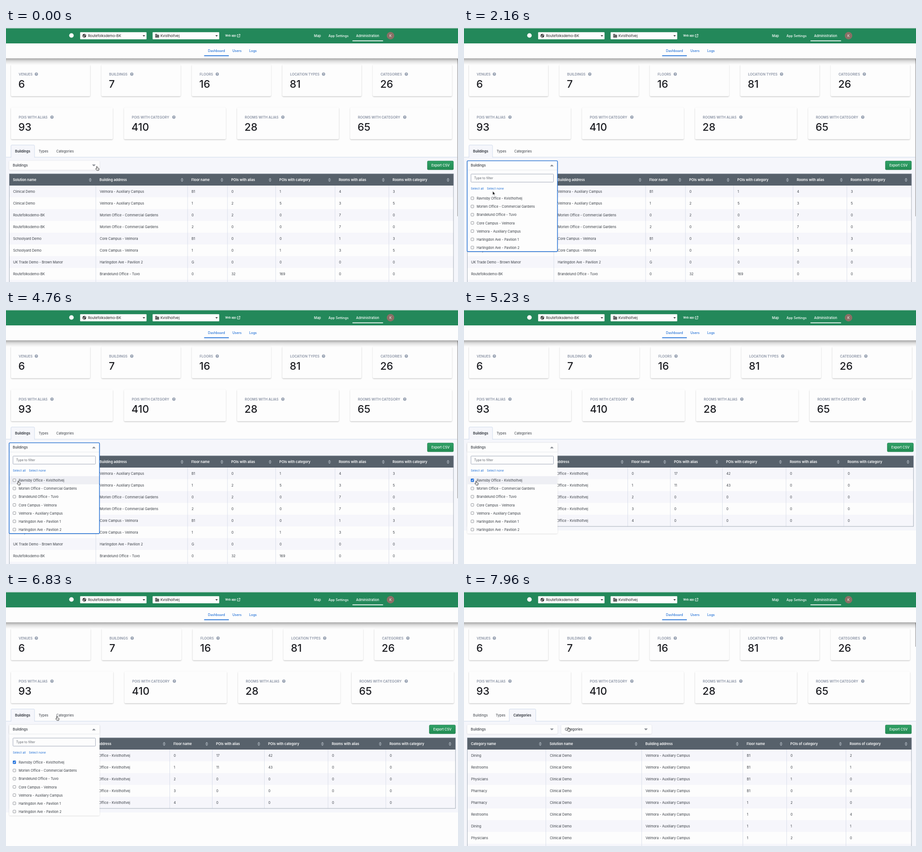
Recreate the animation shown at these times as an HTML page. Size 998 by 561 pixels, loop 8000 ms.

```html
<!DOCTYPE html>
<html lang="en">
<head>
<meta charset="utf-8">
<title>Dashboard filter</title>
<style>
  html, body { margin: 0; width: 100%; height: 100%; overflow: hidden; background: #fdfdfd; }
  svg { display: block; width: 100%; height: 100%; font-family: Inter, Roboto, "Liberation Sans", sans-serif; }
  text { white-space: pre; }
</style>
</head>
<body>
<svg id="stage" viewBox="0 0 998 561"></svg>
<script>
const LOOP = 8000;
const INK = '#383d44', BLUE = '#1f6fd6', GREEN = '#23885a', PANEL = '#f5f6fb';

// ---- drawing helpers ----
const rect = (x, y, w, h, fill, extra = '') =>
  `<rect x="${x}" y="${y}" width="${w}" height="${h}" fill="${fill}" ${extra}/>`;
const path = (d, fill, extra = '') => `<path d="${d}" fill="${fill}" ${extra}/>`;
const line = (x1, y1, x2, y2, color, width = 1) =>
  path(`M${x1} ${y1}L${x2} ${y2}`, 'none', `stroke="${color}" stroke-width="${width}"`);
// y is the middle of the capitals
const text = (x, y, str, size = 7.45, weight = 400, fill = INK, extra = '') =>
  `<text x="${x}" y="${y + size * 0.36}" font-size="${size}" font-weight="${weight}" fill="${fill}" ${extra}>${str}</text>`;
const down = (x, y, w, h, fill) => path(`M${x - w} ${y - h}H${x + w}L${x} ${y + h}Z`, fill);
const up = (x, y, w, h, fill) => path(`M${x - w} ${y + h}H${x + w}L${x} ${y - h}Z`, fill);
const group = (id, body, extra = '') => `<g id="${id}" ${extra}>${body}</g>`;

// ---- names ----
const ROUTE = 'Routefolksdemo-BK', CLINIC = 'Clinical Demo', SCHOOL = 'Schoolyard Demo';
const STREET = 'Kvistholtvej';
const SATELLITE = 'Velmora - Auxiliary Campus', MAIN = 'Core Campus - Velmora';
const TERRACE = 'Morlen Office - Commercial Gardens', HARBOUR = 'Brandelund Office - Tuvo';
const AVENUE = 'Harlingdon Ave - Pavilion ', RIVER = `Ravnsby Office - ${STREET}`;
const PLACES = [RIVER, TERRACE, HARBOUR, MAIN, SATELLITE, AVENUE + 1, AVENUE + 2];

// ---- top of the page ----
function topBar() {
  const picker = (x, w, name) =>
    rect(x, 9.3, w, 15.6, '#fdfdfd', 'rx="1.2"') + text(x + 17.3, 17, name, 7.75, 400, '#1c1c1c') +
    down(x + w - 5.8, 17.5, 2.7, 1.4, '#333');
  const globe = `<circle cx="173" cy="17" r="4" fill="#333"/>` +
    path('M170.3 15.2L172 17.6 173.2 18 172.8 20.2 171 18.6ZM173.5 13.8L175.6 15 174.8 17.4 173.6 15.8Z', '#fdfdfd');
  const block = path('M329.5 13H333.6V15H338V21H329.5Z', '#444') +
    [14.3, 16.2, 18.1].map(y => rect(330.6, y, 2, 0.8, '#fdfdfd')).join('') +
    [16.4, 18.4].map(y => rect(334.6, y, 2, 0.8, '#fdfdfd')).join('');
  return rect(0, 0, 998, 34, GREEN) + rect(0, 0, 998, 0.8, '#dbe7e0') +
    `<circle cx="144.5" cy="16.5" r="5" fill="#fdfdfd"/>` +
    picker(163.7, 146.6, ROUTE) + globe + picker(323.7, 147.1, STREET) + block +
    text(484, 17, 'Web app', 5.6, 600, '#fff') +
    path('M513 14.5H510.7V20H516.2V17.6M514 13.9H516.8V16.7M516.6 14.1L513 17.7', 'none', 'stroke="#fff" stroke-width=".9"') +
    text(680, 17, 'Map', 7.35, 500, '#fff') + text(712, 17, 'App Settings', 7.25, 500, '#fff') +
    text(773, 17, 'Administration', 7.35, 500, '#fff') + rect(765, 27.5, 67.5, 1.7, '#fff') +
    `<circle cx="849" cy="17" r="8.3" fill="#8b6f66"/>` +
    text(849, 17, 'K', 8, 400, '#f5efec', 'text-anchor="middle"') +
    rect(0, 34, 998, 33, '#fdfdfd') +
    text(446, 50.3, 'Dashboard', 7.2, 500, BLUE) + text(500, 50.3, 'Users', 7.2, 500, BLUE) +
    text(537, 50.3, 'Logs', 7.2, 500, BLUE) + rect(437.5, 60.4, 54.5, 1.8, BLUE);
}

// ---- statistic cards ----
// each entry: label, value, distance from label start to help icon
const STATS = [
  [['VENUES', 6, 39], ['BUILDINGS', 7, 50], ['FLOORS', 16, 39], ['LOCATION TYPES', 81, 74], ['CATEGORIES', 26, 57]],
  [['POIS WITH ALIAS', 93, 73.5], ['POIS WITH CATEGORY', 410, 93], ['ROOMS WITH ALIAS', 28, 84], ['ROOMS WITH CATEGORY', 65, 103.5]]
];
function cards(right) {
  const gap = 25;
  return STATS.map((row, r) => {
    const w = (right - 11 + gap) / row.length - gap, y = 80.5 + r * 95;
    return row.map(([label, value, help], i) => {
      const x = 11 + i * (w + gap), tx = x + 17;
      return rect(x, y, w, 70, '#fdfdfd', 'rx="2.5" filter="url(#lift)"') +
        text(tx, y + 21.7, label, 7.5, 600, '#8891a3') +
        `<circle cx="${tx + help}" cy="${y + 21.3}" r="3.6" fill="#98a2b2"/>` +
        text(tx + help, y + 21.4, '?', 5.4, 700, '#fdfdfd', 'text-anchor="middle"') +
        text(tx - 0.7, y + 43, value, 23, 500, '#1c1d22');
    }).join('');
  }).join('');
}

// ---- tabs, toolbar and table ----
function tabs(active) {
  const [x0, x1] = active ? [100, 158.5] : [11, 63];
  const xs = active ? [20, 70, 109] : [20, 72, 111];
  return line(0, 285.3, 998, 285.3, '#cdd9ea') +
    path(`M${x0} 286V260.5Q${x0} 258.5 ${x0 + 2} 258.5H${x1 - 2}Q${x1} 258.5 ${x1} 260.5V286`, PANEL, 'stroke="#c6d4e8" stroke-width=".8"') +
    ['Buildings', 'Types', 'Categories'].map((s, i) =>
      text(xs[i], 272, s, 7.5, i === active ? 600 : 400, i === active ? '#2b2f36' : INK)).join('');
}
const closedSelect = (x, label) =>
  rect(x, 293.3, 199.5, 20, '#fdfdfd', 'rx="2.5" filter="url(#soft)"') +
  text(x + 8, 303.5, label, 7.5, 500) + down(x + 187, 303.4, 4, 2, '#858a91');

function table(right, seps, heads, rows, ends) {
  const starts = [7, ...seps], stops = [...seps, right];
  const bottom = ends ? 348 + 26 * rows.length : 570;
  let out = rect(7, 322, right - 7, 26, '#57616b');
  for (let i = 0; i < (ends ? rows.length : 9); i++)
    out += rect(7, 348 + 26 * i, right - 7, 26, i % 2 ? '#fdfdfd' : '#f6f6fb');
  out += seps.map(x => line(x, 348, x, bottom, '#d3dae6', 0.8)).join('');
  out += rect(7.3, 322, right - 7.6, bottom - 322, 'none', 'stroke="#8e99a6" stroke-width=".8"');
  heads.forEach((head, i) => {
    const x = stops[i] - 12.3;
    out += text(starts[i] + 8.2, 335.3, head, 7.5, 600, '#fff') +
      up(x, 333, 3.3, 1.9, '#98a1aa') + down(x, 338.1, 3.3, 1.9, '#98a1aa');
  });
  rows.forEach((row, r) => row.forEach((cell, c) => {
    out += text(starts[c] + 8.7, 361.3 + 26 * r, cell);
  }));
  return out;
}

function view(id, { right, seps, heads, rows, tab = 0, ends = false, thumb = 0 }) {
  return group(id,
    rect(0, 285, 998, ends ? 202 : 276, PANEL) + cards(right - 3.7) + tabs(tab) +
    closedSelect(7, 'Buildings') + (tab ? closedSelect(214.7, 'Categories') : '') +
    rect(right - 57.9, 293.8, 57.5, 19.2, 'url(#button)', 'rx="1.8" stroke="#1f7d4b" stroke-width=".8"') +
    text(right - 29, 303.5, 'Export CSV', 7.35, 500, '#fff', 'text-anchor="middle"') +
    table(right, seps, heads, rows, ends) +
    (thumb ? rect(996.4, 68, 1.6, thumb, '#b2b2b5', 'rx=".8"') : ''));
}

const BUILDING_HEADS = ['Solution name', 'Building address', 'Floor name', 'POIs with alias',
  'POIs with category', 'Rooms with alias', 'Rooms with category'];
const buildings = {
  right: 988.3, thumb: 348, seps: [198.3, 401, 489, 595.4, 726.5, 845.4], heads: BUILDING_HEADS,
  rows: [
    [CLINIC, SATELLITE, 'B1', 0, 1, 4, 3],
    [CLINIC, SATELLITE, 1, 2, 5, 3, 5],
    [ROUTE, TERRACE, 0, 2, 0, 7, 0],
    [ROUTE, TERRACE, 2, 0, 0, 7, 0],
    [SCHOOL, MAIN, 'B1', 0, 0, 1, 3],
    [SCHOOL, MAIN, 1, 0, 1, 3, 5],
    ['UK Trade Demo - Brown Manor', AVENUE + 2, 'G', 0, 0, 0, 0],
    [ROUTE, HARBOUR, 0, 32, 169, 0, 0]
  ]
};
const filtered = {
  right: 992.6, ends: true, seps: [164, 361.5, 455.5, 570.5, 711, 838.6], heads: BUILDING_HEADS,
  rows: [[17, 42], [11, 43], [0, 0], [0, 0], [0, 0]].map((p, floor) => [ROUTE, RIVER, floor, ...p, 0, 0])
};
const categories = {
  right: 988.3, thumb: 53, tab: 2, seps: [180.7, 392.3, 615.7, 712.4, 843.4],
  heads: ['Category name', 'Solution name', 'Building address', 'Floor name', 'POIs of category', 'Rooms of category'],
  rows: [['Dining', 'B1', 0, 2], ['Restrooms', 'B1', 0, 1], ['Physicians', 'B1', 1, 0], ['Pharmacy', 'B1', 0, 0],
    ['Pharmacy', 1, 2, 0], ['Restrooms', 1, 0, 4], ['Dining', 1, 1, 1], ['Physicians', 1, 2, 0]]
    .map(([name, ...rest]) => [name, CLINIC, SATELLITE, ...rest])
};

// ---- open filter list ----
function filterList() {
  const rowY = i => 376.4 + 18.15 * i;
  return rect(7, 293.3, 199.5, 200.5, '#fdfdfd', 'rx="2.5" filter="url(#soft)"') +
    group('rowHover', rect(8, 367, 198, 18, '#eeeff4')) +
    text(15, 303.5, 'Buildings', 7.5, 500) + up(194, 303.4, 4, 2, '#858a91') +
    line(7.5, 313.7, 206, 313.7, '#dfe2e8', 0.8) +
    rect(15.4, 322.6, 182.2, 17.8, '#fdfdfd', 'rx="1" stroke="#98a1b3" stroke-width=".9"') +
    text(22.5, 331.5, 'Type to filter', 7, 400, '#5f646c') +
    text(15, 354.4, 'Select all', 6.7, 400, BLUE, 'id="linkAll"') +
    text(50.4, 354.4, 'Select none', 6.7, 400, BLUE, 'id="linkNone"') +
    PLACES.map((name, i) => {
      const y = rowY(i) - 0.4;
      return rect(15.5, y - 3, 6, 6, '#fff', 'rx=".9" stroke="#777a80" stroke-width=".8"') +
        group('check' + i, rect(15.1, y - 3.4, 6.8, 6.8, '#1a6fe0', 'rx="1"') +
          path(`M16.7 ${y + 0.1}L18 ${y + 1.5} 20.5 ${y - 1.6}`, 'none', 'stroke="#fff" stroke-width="1.1"')) +
        text(28, rowY(i), name, 7.4);
    }).join('');
}

const cursors =
  group('arrow', path('M0 0V8.2L1.9 6.4 3.2 9.3 4.5 8.7 3.2 5.9H5.8Z', '#111', 'stroke="#fff" stroke-width=".6"')) +
  group('hand', path('M2.3 5.8V1.1Q2.3 .2 3.1 .2T3.9 1.1V3.6L4.4 3.5Q5.2 3.4 5.4 4Q6.2 3.6 6.7 4.3Q7.6 4.1 7.8 5V6.8Q7.6 8 7 9.4H3.2Q1.8 7.8 .6 6.3Q.2 5.2 1.2 5.2Z',
    '#fff', 'stroke="#111" stroke-width=".8" transform="translate(-3)"') +
    path('M1.2 6V8M2.5 6V8M3.7 6V8', 'none', 'stroke="#333" stroke-width=".4"'));

document.getElementById('stage').innerHTML = `<defs>
  <filter id="lift" x="-5%" y="-10%" width="110%" height="125%"><feDropShadow dx="0" dy="1.2" stdDeviation=".9" flood-opacity=".28"/></filter>
  <filter id="soft" x="-5%" y="-20%" width="110%" height="150%"><feDropShadow dx="0" dy=".6" stdDeviation=".8" flood-opacity=".18"/></filter>
  <linearGradient id="shade" x2="0" y2="1"><stop stop-opacity=".34"/><stop offset=".45" stop-opacity=".12"/><stop offset="1" stop-opacity="0"/></linearGradient>
  <linearGradient id="button" x2="0" y2="1"><stop stop-color="#2fa066"/><stop offset="1" stop-color="#238b53"/></linearGradient>
  </defs>` + rect(0, 0, 998, 561, '#fdfdfd') +
  view('buildings', buildings) + view('filtered', filtered) + view('categories', categories) +
  rect(0, 67, 998, 14, 'url(#shade)') + topBar() +
  group('list', filterList()) +
  rect(7, 293.4, 199.4, 20, 'none', `id="focus" rx="1.5" stroke="${BLUE}" stroke-width="1.4"`) +
  group('cursor', cursors);

// ---- motion ----
const linear = k => k;
const easeOut = k => 1 - (1 - k) ** 2;
const easeInOut = k => k * k * (3 - 2 * k);

// time, x, y of the pointer tip, easing towards that point
const POINTER = [
  [0, 200.5, 305.3], [200, 200.5, 305.3], [230, 199.2, 305.3, linear],
  [1290, 199.2, 305.3], [1360, 191.8, 316.3, linear],
  [1820, 191.8, 316.3], [2160, 63.5, 360.5, linear], [2330, 43, 363, easeOut], [2630, 33.6, 352.8, easeOut],
  [3520, 33.6, 352.8], [3660, 69, 354.2, easeInOut],
  [4250, 69, 354.2], [4760, 27, 377.3, easeOut], [4930, 26.6, 377.5, easeOut],
  [6090, 26.6, 377.5], [6360, 79, 307, linear], [6830, 112.3, 274.3, easeOut],
  [7540, 112.3, 274.3], [7960, 230, 298.7, easeInOut], [LOOP, 230, 298.7]
];
function pointerAt(t) {
  const i = Math.max(1, POINTER.findIndex(p => p[0] >= t));
  const [t0, x0, y0] = POINTER[i - 1], [t1, x1, y1, ease = linear] = POINTER[i];
  const k = ease((t - t0) / (t1 - t0));
  return [x0 + (x1 - x0) * k, y0 + (y1 - y0) * k];
}

const el = id => document.getElementById(id);
const show = (id, on) => el(id).setAttribute('display', on ? 'inline' : 'none');
const underline = (id, on) => el(id).setAttribute('text-decoration', on ? 'underline' : 'none');
const within = (v, from, to) => v >= from && v < to;

function render(t) {
  const [x, y] = pointerAt(t);
  const open = within(t, 530, 6930), allChecked = within(t, 2860, 4000);
  show('buildings', t < 5230);
  show('filtered', within(t, 5230, 7100));
  show('categories', t >= 7100);

  show('list', open);
  show('focus', within(t, 430, 5100));
  el('focus').setAttribute('height', open ? 200.4 : 20);
  show('rowHover', open && y > 366);
  const onLinks = open && within(y, 350, 359);
  underline('linkAll', onLinks && within(x, 15, 44));
  underline('linkNone', onLinks && within(x, 50, 88));
  PLACES.forEach((_, i) => show('check' + i, allChecked || (i === 0 && t >= 5230)));

  const hand = y < 314 || y > 366;
  show('hand', hand);
  show('arrow', !hand);
  el('cursor').setAttribute('transform', `translate(${x} ${y})`);
}

const start = performance.now();
function tick() {
  render((performance.now() - start) % LOOP);
  requestAnimationFrame(tick);
}
tick();
</script>
</body>
</html>
```
